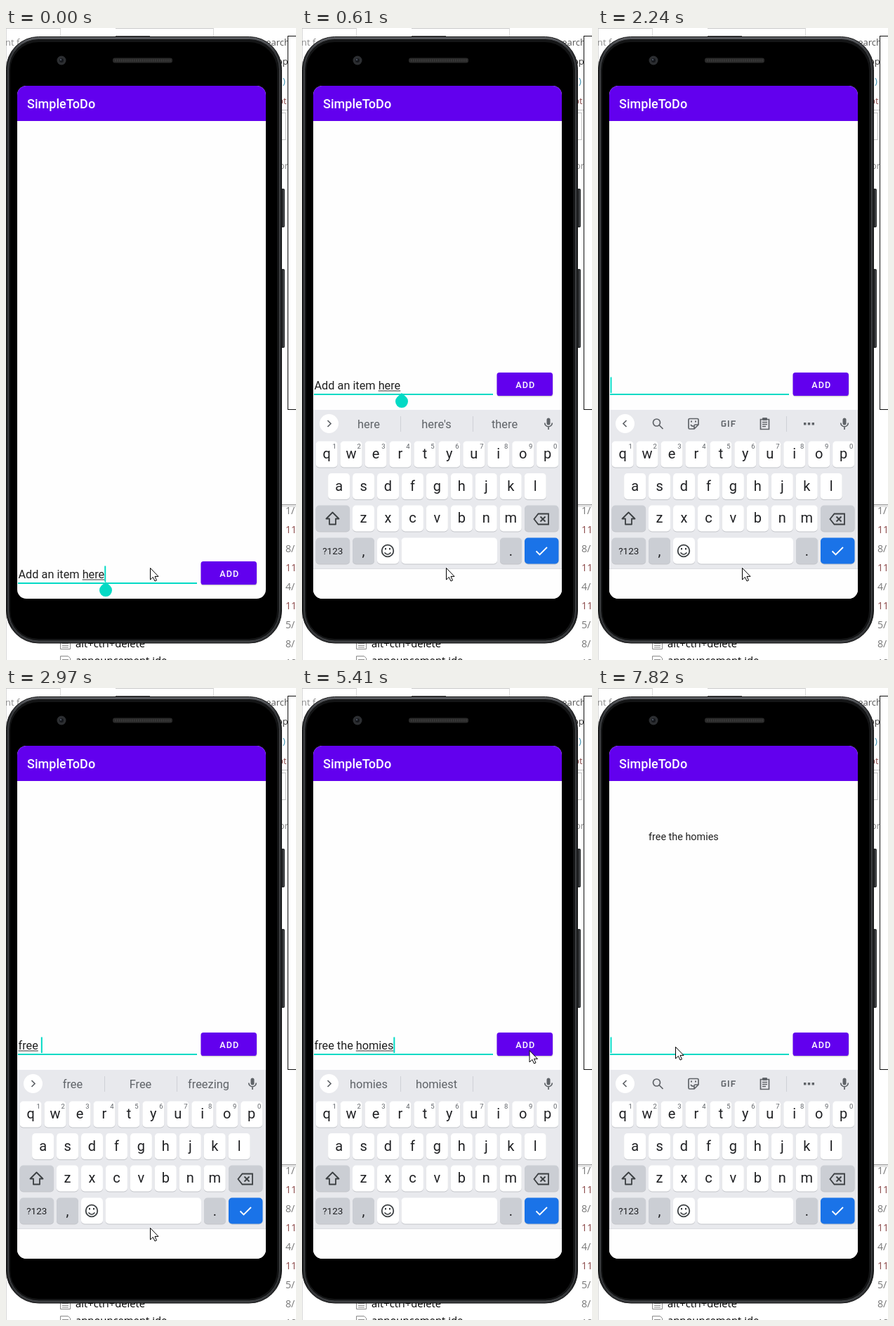
These frames come from a looping animation (413x897 px, 8 s). An HTML page:

```html
<!DOCTYPE html>
<html lang="en">
<head>
<meta charset="utf-8">
<title>SimpleToDo</title>
<style>
  html, body { margin: 0; width: 100%; height: 100%; overflow: hidden; background: #fff; }
  svg { display: block; width: 413px; height: 897px; font-family: Roboto, sans-serif; }
  text { white-space: pre; }
  .desk { font-family: "Open Sans", sans-serif; font-size: 14.2px; }
  .key { font-size: 20px; fill: #202124; text-anchor: middle; }
  .num { font-size: 9.5px; fill: #5f6368; text-anchor: middle; }
  .chip { font-size: 16.4px; fill: #5f6368; text-anchor: middle; }
  .line { fill: none; stroke: #5f6368; stroke-width: 1.7; }
  .ink { fill: #5f6368; }
</style>
</head>
<body>
<svg viewBox="0 0 413 897">
  <defs>
    <clipPath id="screen"><rect x="16" y="82" width="354" height="728" rx="13"/></clipPath>
    <linearGradient id="rim" x2="0" y2="1">
      <stop stop-color="#63656a"/><stop offset=".03" stop-color="#2b2d30"/>
      <stop offset=".97" stop-color="#242628"/><stop offset="1" stop-color="#3a3c3f"/>
    </linearGradient>
  </defs>

  <g class="desk" id="desk">
    <path d="M.5 0V897M77.5 0V14M295.5 0V14" stroke="#d9d9d9"/>
    <path d="M0 .5H77M156 .5H295" stroke="#c8c8c8"/>
    <path d="M156 11.5H205" stroke="#555"/>
    <text x="-1" y="25" fill="#8a8a8a" font-size="13">nt f</text>
    <text x="364" y="25" fill="#555" font-size="13">search</text>
    <text x="386" y="52" fill="#333" font-size="13">op</text>
    <text x="386" y="80" fill="#3c8fb0" font-size="13">n)</text>
    <text x="387" y="108" fill="#8a4a4a" font-size="13">pt</text>
    <path d="M380 116.5H401M380 120.5H398.5V158.5H380" fill="none" stroke="#c4c4c4"/>
    <text x="389" y="200" fill="#888" font-size="13">or</text>
    <rect x="401.5" y="11.5" width="20" height="530" fill="#fff" stroke="#111"/>
    <rect x="385" y="676" width="28" height="1" fill="#9c9c9c"/>
    <rect x="385" y="677" width="28" height="3" fill="#e4e4e4"/>
    <g fill="#fff" stroke="#8a8a8a">
      <path d="M77.500 866.500H88.500L91.500 869.500V881.500H77.500ZM77.500 891.500H88.500L91.500 894.500V905H77.500Z"/>
      <path d="M80 873.500H89M80 876.500H89M80 879H89M80 896.500H89"/>
    </g>
    <text x="99" y="879" font-size="14.800">alt+ctrl+delete</text>
    <text x="99" y="902.500" font-size="14.800">announcement.ide</text>
  </g>

  <g id="phone">
    <rect x="389" y="228" width="8" height="55" rx="2" fill="#2b2d2f"/>
    <rect x="389" y="342" width="8" height="112" rx="2" fill="#2b2d2f"/>
    <path d="M395.500 230V281M395.500 344V452" stroke="#55575a"/>
    <rect x=".5" y="12.500" width="392" height="860.500" rx="46" fill="url(#rim)" stroke="#111"/>
    <rect x="3.500" y="15.500" width="386" height="854.500" rx="43" fill="#141516" stroke="#4a4c4f"/>
    <rect x="6" y="20" width="380" height="847" rx="40"/>
    <circle cx="79" cy="46" r="6.500" fill="#2c2e31"/>
    <circle cx="79" cy="46" r="3" fill="#15171b"/>
    <circle cx="78" cy="45" r="1.200" fill="#4b5260"/>
    <rect x="152" y="42.500" width="85" height="7" rx="3" fill="#2a2a2a"/>
    <path d="M155 46H235" stroke="#3c3c3c" stroke-width="3" stroke-dasharray="1.500 1.500"/>
  </g>

  <g clip-path="url(#screen)">
    <rect x="16" y="82" width="354" height="728" fill="#fefefe"/>
    <rect x="16" y="82" width="354" height="50" fill="#6200ee"/>
    <text x="30" y="114" fill="#fff" font-size="18.060" font-weight="500">SimpleToDo</text>
    <text id="item" x="72" y="216" fill="#212121" font-size="14.400">free the homies</text>

    <g id="form">
      <rect x="17" y="519" width="255" height="2" fill="#03dac5"/>
      <text id="entry" x="17.500" y="513" fill="#212121" font-size="16.300"></text>
      <rect id="mark" y="514.500" height="1" fill="#333"/>
      <rect id="caret" y="495.500" width="2" height="22.500" fill="#03dac5"/>
      <path id="handle" d="M142 518L148.400 523.700A9 9 0 1 1 135.600 523.700Z" fill="#03dac5"/>
      <rect x="277.500" y="490.500" width="80" height="33" rx="4" fill="#000" opacity=".16"/>
      <rect id="button" x="277.500" y="489" width="79.500" height="33" rx="3.600"/>
      <text x="318.300" y="510.500" fill="#fff" font-size="12.640" font-weight="500" letter-spacing="1.130" text-anchor="middle">ADD</text>
    </g>

    <g id="board">
      <rect x="16" y="542" width="354" height="268" fill="#fefefe"/>
      <rect x="16" y="542" width="354" height="225" fill="#e8e9ed"/>
      <rect x="16" y="767" width="354" height="1" fill="#dcdde1"/>
      <circle cx="38.500" cy="561.500" r="13.500" fill="#fff"/>
      <path id="chevron" class="line"/>
      <g id="mic">
        <rect class="ink" x="348.500" y="553.500" width="5" height="10" rx="2.500"/>
        <path class="line" d="M345.700 560.500A5.300 5.300 0 0 0 356.300 560.500M351 566V570"/>
      </g>
      <g id="words">
        <path d="M140.500 551V573M243.500 551V573" stroke="#cfd1d6"/>
        <text class="chip" x="95" y="568"></text>
        <text class="chip" x="191.500" y="568"></text>
        <text class="chip" x="288.500" y="568"></text>
      </g>
      <g id="tools">
        <circle class="line" cx="83.500" cy="560" r="5"/>
        <path class="line" d="M87 563.500L92.500 569"/>
        <path class="line" d="M130.500 554.500H141.500Q143 554.500 143 556V563L137 569H130.500Q129 569 129 567.500V556Q129 554.500 130.500 554.500ZM143 563H138.500Q137 563 137 564.500V569M132 563Q133.500 565.500 136 565"/>
        <path class="ink" d="M132 557.500h2v2h-2zM138 557.500h2v2h-2z"/>
        <path class="line" stroke-width="2" d="M182 558H177.500Q176.500 558 176.500 559V564Q176.500 565 177.500 565H180.500Q181.500 565 181.500 564V561.500H179.500M185.800 557V566M190.500 566V558H196M190.500 562H195"/>
        <path class="line" d="M231.500 555.500H243.500V569.500H231.500ZM234 559.500H241M234 562.500H241M234 565.500H239"/>
        <rect class="ink" x="234" y="553" width="7" height="4" rx="1"/>
        <path d="M268.500 551V573" stroke="#cfd1d6"/>
        <path class="ink" d="M293 560h3.400v3.400h-3.400zM298.800 560h3.400v3.400h-3.400zM304.600 560h3.400v3.400h-3.400z"/>
      </g>
      <g id="keys"></g>
      <g fill="none" stroke="#3c4043" stroke-width="1.800">
        <path d="M43.500 687.500L52.500 696.500H48V704.500H39V696.500H34.500Z" stroke-linejoin="round"/>
        <path d="M336.500 689.500H351V704.500H336.500L330.500 697ZM339.500 693.500L346.500 700.500M346.500 693.500L339.500 700.500"/>
        <circle cx="122" cy="742" r="8.300"/>
        <path d="M117.500 744.500Q122 750 126.500 744.500" stroke-width="1.600"/>
        <path d="M119 738v2.500M125 738v2.500" stroke-width="2"/>
        <path d="M333.500 742.500L338.500 747.500L349 737" stroke="#fff"/>
      </g>
    </g>
  </g>

  <path id="pointer" d="M0 0V16.500L3.900 12.900L6.500 18.500L9 17.400L6.500 11.900H11.500Z" fill="#fff" stroke="#000" stroke-linejoin="round"/>
</svg>
<script>
const LOOP = 8000;
const $ = id => document.getElementById(id);
const text = (x, y, s, attrs) => `<text x="${x}" y="${y}" ${attrs}>${s}</text>`;

function buildDesk() {
  const dates = ["1/", "11", "8/", "11", "4/", "11", "5/", "8/", "12"];
  $("desk").insertAdjacentHTML("beforeend", dates.map((d, i) =>
    text(398, 690 + i * 27, d, `fill="${d === "11" ? "#8c4a4a" : "#777"}"`)).join(""));
}

function buildKeys() {
  const key = (x, y, w, fill) =>
    `<rect x="${x}" y="${y + 1}" width="${w}" height="37" rx="5" fill="#c3c5ca"/>` +
    `<rect x="${x}" y="${y}" width="${w}" height="37" rx="5" fill="${fill}"/>`;
  const rows = [["qwertyuiop", 19.6, 586.5], ["asdfghjkl", 37.1, 632], ["zxcvbnm", 72, 677.5]];
  let out = "";
  for (const [letters, left, y] of rows)
    [...letters].forEach((c, i) => {
      const x = left + i * 34.95, mid = x + 15.5;
      out += key(x, y, 31, "#fff") + text(mid, y + 24.8, c, 'class="key"');
      if (letters.length === 10) out += text(mid + 11, y + 10.7, (i + 1) % 10, 'class="num"');
    });
  const grey = "#cbced4";
  out += key(19.6, 677.5, 48.5, grey) + key(317, 677.5, 48.5, grey);
  for (const [x, w, fill] of [[19.6, 48.5, grey], [72, 31, grey], [107, 31, "#fff"],
      [141.5, 136.5, "#fff"], [282, 31, grey], [317, 48.5, "#1a73e8"]])
    out += key(x, 723.5, w, fill);
  out += text(43.8, 747, "?123", 'class="key" style="font-size:13.5px"') +
    text(87.5, 749, ",", 'class="key"') + text(297.5, 749, ".", 'class="key"');
  $("keys").innerHTML = out;
}

// Each step: time, then the values that change at that time.
const steps = [
  [0, { entry: "Add an item here", mark: [12, 16], caret: 1, handle: 1, lift: 268, slide: 270,
        words: "here here's there", item: 0, press: 0, at: [205.5, 766.5] }],
  [250, { lift: 0, slide: 150, caret: 0 }],
  [370, { slide: 55 }],
  [490, { slide: 12 }],
  [610, { slide: 0 }],
  [760, { caret: 1 }],
  [1280, { caret: 0 }],
  [1400, { entry: "Add an item her", mark: [12, 15], caret: 1, handle: 0 }],
  [1760, { entry: "Add an item h", mark: [12, 13] }],
  [1880, { entry: "Add an ite", mark: 0, words: "" }],
  [2000, { entry: "Add an " }],
  [2120, { entry: "Add" }],
  [2240, { entry: "" }],
  [2490, { entry: "f", mark: [0, 1] }],
  [2610, { entry: "fr", mark: [0, 2], words: "f for from" }],
  [2730, { entry: "fre", mark: [0, 3], words: "fr free from" }],
  [2850, { entry: "free", mark: [0, 4], words: "fre free Free" }],
  [2970, { entry: "free ", words: "free Free freezing" }],
  [3220, { entry: "free t", mark: [5, 6] }],
  [3340, { entry: "free th", mark: [5, 7], words: "t to the" }],
  [3460, { entry: "free the", mark: [5, 8], words: "the that they" }],
  [3580, { entry: "free the ", words: "the they them" }],
  [3730, { entry: "free the ho", mark: [9, 11] }],
  [3850, { entry: "free the homi", mark: [9, 12], words: "ho home how" }],
  [3970, { entry: "free the homies", mark: [9, 14], words: "homi homies homie" }],
  [4110, { mark: [9, 15] }],
  [4230, { words: "homies homiest" }],
  [4660, { caret: 0, at: [214, 752] }],
  [4780, { at: [292, 668] }],
  [4900, { at: [352, 588] }],
  [5020, { at: [325.5, 545.5] }],
  [5170, { caret: 1, at: [325.5, 530] }],
  [5290, { at: [324.5, 519] }],
  [5410, { at: [324, 514.5] }],
  [5660, { caret: 0, press: 1 }],
  [5810, { entry: "", mark: 0, caret: 1, item: 1 }],
  [5930, { words: "" }],
  [6050, { press: 0 }],
  [6300, { caret: 0 }],
  [6450, { at: [296, 514] }],
  [6570, { at: [208, 511.5] }],
  [6690, { at: [136, 509.5] }],
  [6820, { caret: 1, at: [110.5, 509.5] }],
  [7320, { caret: 0 }],
  [7820, { caret: 1 }]
];

const ruler = document.createElement("canvas").getContext("2d");
const chips = document.querySelectorAll(".chip");
const show = (id, on) => $(id).setAttribute("visibility", on ? "inherit" : "hidden");
const move = (id, x, y) => $(id).setAttribute("transform", `translate(${x} ${y})`);

function draw(s) {
  ruler.font = "16.3px Roboto, sans-serif";
  const width = n => ruler.measureText(s.entry.slice(0, n)).width;
  $("entry").textContent = s.entry;
  $("caret").setAttribute("x", 17.5 + width(s.entry.length));
  const [from, to] = s.mark || [0, 0];
  $("mark").setAttribute("x", 17.5 + width(from));
  $("mark").setAttribute("width", width(to) - width(from));
  show("caret", s.caret);
  show("handle", s.handle);
  show("item", s.item);
  show("words", s.words);
  show("tools", !s.words);
  const words = s.words.split(" ");
  chips.forEach((c, i) => { c.textContent = words[i] || ""; });
  $("chevron").setAttribute("d", s.words ? "M36.500 557L41 561.500L36.500 566" : "M40.500 557L36 561.500L40.500 566");
  $("button").setAttribute("fill", s.press ? "#7f33f1" : "#6200ee");
  move("form", 0, s.lift);
  move("board", 0, s.slide);
  move("pointer", ...s.at);
}

let last = -1;
function tick() {
  const t = (performance.now() - start) % LOOP;
  const now = steps.filter(([at]) => at <= t);
  if (now.length !== last) {
    last = now.length;
    draw(Object.assign({}, ...now.map(step => step[1])));
  }
  requestAnimationFrame(tick);
}

buildDesk();
buildKeys();
const start = performance.now();
tick();
</script>
</body>
</html>
```
